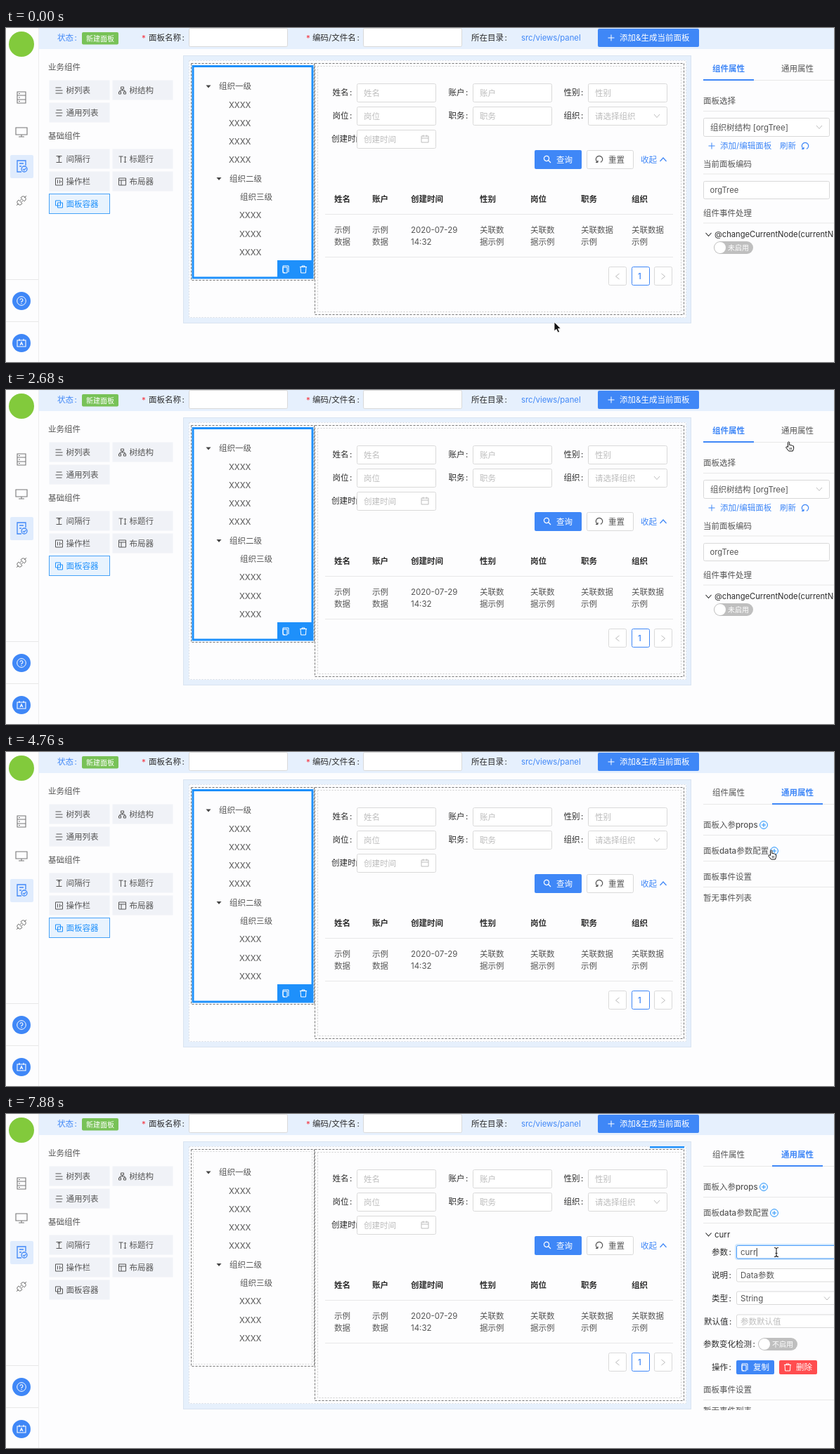
An HTML page that plays this animation: 1178x476 px, repeating every 8000 ms.

```html
<!DOCTYPE html>
<html lang="zh-CN">
<head>
<meta charset="utf-8">
<title>面板编辑器</title>
<style>
html, body { margin: 0; width: 100%; height: 100%; overflow: hidden; background: #fdfdfe; }
svg { display: block; overflow: hidden; }
text { font: 11.5px Inter, "Noto Sans CJK SC", "Noto Sans CJK", sans-serif; white-space: pre; }
</style>
</head>
<body>
<svg id="stage" width="1178" height="476" viewBox="0 0 1178 476"></svg>
<script>
const BLUE = '#3f87f7', BRIGHT = '#1e90fb', TEXT = '#555', DARK = '#2b2b2b';
const HINT = '#bdbdbd', LINE = '#e8e8e8', EDGE = '#d9d9d9', LIGHT = '#5ea6ff';

// Drawing helpers; text is placed by its left edge and vertical centre.
const text = (x, y, s, color = TEXT, weight = 400, size = 11.5) =>
  `<text x="${x}" y="${y + size * .37}" fill="${color}" style="font-weight:${weight};font-size:${size}px">${s.replace(/&/g, '&amp;')}</text>`;
const box = (x, y, w, h, fill, stroke = 'none', r = 0, extra = '') =>
  `<rect x="${x}" y="${y}" width="${w}" height="${h}" rx="${r}" fill="${fill}" stroke="${stroke}" ${extra}/>`;
const icon = (x, y, d, color = TEXT, width = 1, fill = 'none') =>
  `<path transform="translate(${x} ${y})" d="${d}" fill="${fill}" stroke="${color}" stroke-width="${width}"/>`;
const dot = (x, y, r, fill, stroke = 'none') =>
  `<circle cx="${x}" cy="${y}" r="${r}" fill="${fill}" stroke="${stroke}"/>`;
const rule = (x, y, w, color = LINE) => box(x, y, w, 1, color);
const group = (id, body, extra = '') => `<g id="${id}" ${extra}>${body}</g>`;
const label = (x, y, s, color = DARK) =>
  text(x, y, s, color) + text(x + s.replace('/', '').length * 11.5 + (s.includes('/') ? 6 : 1.5), y, ':', color);
const field = (x, y, w, h, s = '', color = TEXT, pad = 10) =>
  box(x + .5, y + .5, w - 1, h - 1, '#fff', EDGE, 2) + text(x + pad, y + h / 2, s, color);
const dashes = (x, y, w, h, color, dash = '3 2') =>
  box(x + .5, y + .5, w, h, 'none', color, 0, `stroke-dasharray="${dash}"`);
const toggle = (x, y, s) =>
  box(x, y, 56, 18, '#bfbfbf', 'none', 9) + dot(x + 9, y + 9, 8, '#fff') + text(x + 20, y + 9, s, '#fff', 400, 10);

const SHAPE = {
  down: 'M-4-2L0 2.5L4-2', up: 'M-4.5 2.5L0-2.5L4.5 2.5', left: 'M2.5-4L-2.5 0L2.5 4', right: 'M-2.5-4L2.5 0L-2.5 4',
  plus: 'M-4.5 0H4.5M0-4.5V4.5', reload: 'M-2 4.4A4.7 4.7 0 1 1 2 4.4M-2 4.4H-5M-2 4.4V1.8',
  search: 'M1.5 1.5A3.6 3.6 0 1 1 1.6 1.4L5 5',
  copy: 'M-4-5H4V4M-4-5V5H-1M-4-3H2V5H-2L-4 3Z', trash: 'M-5-3.5H5M-2-3.5V-5H2V-3.5M-4-3.5L-3.4 5H3.4L4-3.5',
  calendar: 'M-5-4H5V5H-5ZM-5-1H5M-2.5-5.5V-3M2.5-5.5V-3',
  lines: 'M-5-4H3M-5 0H5M-5 4H5', list: 'M-4-4H4M-5 0H5M-4 4H4',
  tree: 'M-2-5H2V-2H-2ZM-5 2H-2V5H-5ZM2 2H5V5H2ZM0-2V0M-3.5 2V0H3.5V2',
  gap: 'M-4-4.5H4M-4 4.5H4M0-4V4M-2-2L0-4L2-2', title: 'M-5-4H1M-2-4V5M4-4V5M2.5-2.5L4-4L5.5-2.5M2.5 3.5L4 5L5.5 3.5',
  bar: 'M-5-5H5V5H-5ZM-2-2.5V2.5M1-2.5V2.5M3-1V1', layout: 'M-5-5H5V5H-5ZM-5-2H5M-1.5-2V5',
  panel: 'M-5-5H2V2H-5ZM-2-2H5V5H-2Z'
};
const put = (x, y, name, color, width) => icon(x, y, SHAPE[name], color, width);

function header() {
  return box(47, 0, 1131, 30, '#e6f0fd') + label(73, 14, '状态', BLUE) +
    box(108, 6, 52, 17.5, '#78c257', 'none', 2) + text(114, 15, '新建面板', '#fff', 400, 10) +
    text(193, 15, '*', '#f5333f') + label(203, 14, '面板名称') + field(260, 0, 141, 27) +
    text(427, 15, '*', '#f5333f') + label(436, 14, '编码/文件名') + field(508, 0, 141, 27) +
    label(662, 14, '所在目录') + text(733, 14, 'src/views/panel', BLUE, 400, 11.3) +
    box(842, 1, 144, 26, BLUE, 'none', 2) + put(861, 14, 'plus', '#fff') + text(873, 14, '添加&生成当前面板', '#fff');
}

function sidebar() {
  const gray = '#777';
  return box(46, 0, 1, 476, '#ededed') + dot(22, 23, 18, '#82ca3c') +
    icon(22, 99, 'M-6-8H6V8H-6ZM-6-3H6M-6 3H6M-4-5.5H-2M-4 0H-2M-4 5.5H-2', gray, 1.1) +
    icon(22, 148, 'M-8-6H8V4H-8ZM0 4V7M-4 7H4', gray, 1.1) +
    box(6, 181, 33, 33, '#e0ecfd', 'none', 2) +
    icon(22, 197, 'M6-1V-8H-6V8H0M-3-4H3M-3 0H0M8 4A4 4 0 1 1 0 4A4 4 0 1 1 8 4M2 4L3.7 5.6L6.3 2.7', BLUE, 1.3) +
    icon(22, 246, 'M7-7L4-4M-7 7L-4 4M-1-4L1-6A4 4 0 0 1 6-1L4 1ZM-4-1L-6 1A4 4 0 0 0-1 6L1 4ZM-2 0L0-2M0 2L2 0', gray, 1) +
    rule(0, 358, 46) + rule(0, 418, 46) + dot(22, 389, 13, BLUE) + dot(22, 449, 13, BLUE) +
    dot(22, 389, 6.3, 'none', '#fff') + icon(22, 389, 'M-2-1.5A2 2 0 1 1 0 .8V1.8M0 2.8V4', '#fff', 1.1) +
    icon(22, 449, 'M-6-4H6V5H-6ZM-3-6V-3M3-6V-3M-2 3L0-1.5L2 3M-1.2 1.5H1.2', '#fff', 1.1);
}

function tool(col, y, name, s, on) {
  const x = col ? 151 : 61, color = on ? BRIGHT : TEXT;
  return box(x + .5, y + .5, 86, 28, on ? '#e8f3fe' : '#f0f2f7', on ? '#46a2f8' : 'none') +
    put(x + 14.5, y + 15, name, color) + text(x + 24.5, y + 14.5, s, color);
}

function palette() {
  return text(60, 56, '业务组件') + text(60, 154, '基础组件') +
    tool(0, 74, 'lines', '树列表') + tool(1, 74, 'tree', '树结构') + tool(0, 106, 'list', '通用列表') +
    tool(0, 172, 'gap', '间隔行') + tool(1, 172, 'title', '标题行') +
    tool(0, 204, 'bar', '操作栏') + tool(1, 204, 'layout', '布局器') + tool(0, 236, 'panel', '面板容器');
}

function tree() {
  const rows = [[303, '组织一级', 1], [317, 'XXXX'], [317, 'XXXX'], [317, 'XXXX'], [317, 'XXXX'],
    [318, '组织二级', 1], [333, '组织三级'], [332, 'XXXX'], [332, 'XXXX'], [332, 'XXXX']];
  return rows.map(([x, s, open], i) => {
    const y = 83 + i * 26.3;
    return text(x, y, s) + (open ? icon(x - 15, y, 'M-3.5-1.5H3.5L0 2.5Z', 'none', 0, '#444') : '');
  }).join('');
}

function form() {
  const cols = [499, 664, 828], names = ['姓名', '账户', '性别', '岗位', '职务', '组织', '创建时间'];
  return names.map((s, i) => {
    const x = cols[i % 3], y = 79 + 33 * Math.floor(i / 3);
    return label(i === 6 ? 463 : x - 34.5, y + 13, s) +
      field(x, y, 113, 27, s === '组织' ? '请选择组织' : s, HINT);
  }).join('') + put(926, 125, 'down', HINT) + put(596, 158, 'calendar', HINT) +
    box(752, 174, 67, 27, BLUE, 'none', 2) + put(770, 187, 'search', '#fff', 1.2) + text(783, 187.5, '查询', '#fff', 500) +
    box(826.5, 174.5, 66, 26, '#fff', EDGE, 2) + put(844, 187, 'reload', TEXT, 1.2) + text(857, 187.5, '重置') +
    text(903, 187.5, '收起', BLUE) + put(935, 187.5, 'up', BLUE, 1.2);
}

function table() {
  const cols = [[467, '姓名', '示例', '数据'], [521, '账户', '示例', '数据'], [576, '创建时间', '2020-07-29', '14:32'],
    [674, '性别', '关联数', '据示例'], [746, '岗位', '关联数', '据示例'], [818, '职务', '关联数据', '示例'], [890, '组织', '关联数据', '示例']];
  const page = (x, color) => box(x + .5, 340.5, 25, 26, '#fff', color, 2);
  return cols.map(([x, head, a, b]) => text(x, 243.5, head, DARK, 600) + text(x, 288, a) + text(x, 305, b)).join('') +
    rule(454, 265, 495) + rule(454, 326, 495) + page(857, EDGE) + page(890, BLUE) + page(922, EDGE) +
    put(870, 354, 'left', HINT) + put(935, 354, 'right', HINT) + text(899, 354, '1', BLUE, 500);
}

function canvas() {
  return box(252.5, 39.5, 722, 381, '#e6f0fc', '#d9e4f1') + box(260, 46, 708, 367, '#fdfdfe') +
    dashes(260, 46, 707, 366, '#d8dde4', '2 2') +
    dashes(263, 50, 175, 309, '#777') + dashes(266, 53, 169, 303, '#d5d5d5', '2 2') +
    dashes(439, 50, 525, 358, '#777') + dashes(443, 54, 517, 350, '#cfcfcf', '2 2') +
    tree() + form() + table() +
    group('hover', [[262, 49, 703, 360], [442, 54, 518, 350], [445, 58, 512, 342]]
      .map(([x, y, w, h]) => box(x + .5, y + .5, w, h, 'none', '#2f97f5')).join('')) +
    group('picked', tool(0, 236, 'panel', '面板容器', true) + box(266, 54.5, 170, 301.5, 'none', BRIGHT, 0, 'stroke-width="3"') +
      box(386, 331, 51, 26, BRIGHT) + put(398, 344, 'copy', '#fff') + put(423, 344, 'trash', '#fff')) +
    group('strip', box(916, 46, 49, 2.5, BRIGHT));
}

const addMark = (x, y) => dot(x, y, 5.4, 'none', BRIGHT) + icon(x, y, 'M-3 0H3M0-3V3', BRIGHT);
const section = (y, s) => text(992, y, s, TEXT, 500) + rule(992, y + 14, 186);

function partTab() {
  return section(104, '面板选择') + field(992, 128, 180, 27, '组织树结构 [orgTree]') + put(1157, 141, 'down', HINT) +
    put(1004, 168, 'plus', BLUE) + text(1016, 168, '添加/编辑面板', BLUE) + text(1101, 168, '刷新', BLUE) + put(1137, 168, 'reload', BLUE, 1.2) +
    section(193.5, '当前面板编码') + field(992, 218, 180, 26) + text(1001.5, 231, 'orgTree', TEXT, 400, 11.2) + section(263.5, '组件事件处理') +
    put(999.5, 294, 'down', DARK, 1.1) + text(1008, 294, '@changeCurrentNode(currentNode)', DARK, 400, 11.2) + toggle(1007, 304, '未启用');
}

function commonTab() {
  const row = (y, x, name, s, color) => label(x, y, name) + field(1039, y - 10, 160, 19.5, s, color, 6);
  return section(104, '面板入参props') + addMark(1078, 104) + section(141, '面板data参数配置') + addMark(1093, 141) +
    group('empty', section(178, '面板事件设置') + text(992, 208, '暂无事件列表')) +
    group('params', put(999.5, 171.5, 'down', DARK, 1.1) + `<g id="head"></g>` + row(197, 1004, '参数', '') +
      `<g id="entry"></g>` + row(230, 1004, '说明', 'Data参数') + row(262.5, 1004, '类型', 'String') +
      put(1168, 262.5, 'down', HINT) + row(295.5, 993, '默认值', '参数默认值', HINT) +
      label(992, 328, '参数变化检测') + toggle(1070, 319, '不启用') + label(1004, 361, '操作') +
      box(1039, 351, 54, 20, BLUE, 'none', 2) + put(1051, 361, 'copy', '#fff') + text(1063, 361, '复制', '#fff') +
      box(1100, 351, 54, 20, '#ff4d4f', 'none', 2) + put(1112, 361, 'trash', '#fff') + text(1124, 361, '删除', '#fff') +
      section(393, '面板事件设置') + group('cut', text(992, 423, '暂无事件列表'), 'clip-path="url(#fold)"'));
}

const pointers = {
  arrow: icon(0, 0, 'M0 0V13L3 10.3L5.2 15L7.5 14L5.4 9.5H9.3Z', '#fff', .8, '#111'),
  hand: icon(0, 0, 'M3.5 8.5V1.6Q4.6 0 5.7 1.6V5.6Q7 4.6 7.8 5.9Q9.2 5.2 9.8 6.6Q11.5 6 11.6 8V10.5L10.4 14H4.6L.8 9.2Q.8 7.5 2.3 7.8Z', '#111', 1, '#fff') +
    icon(0, 0, 'M6.3 9V12M8.3 9V12', '#111', .8),
  beam: icon(0, 0, 'M-3-6.5Q0-6.5 0-4.5Q0-6.5 3-6.5M0-4.5V4.5M-3 6.5Q0 6.5 0 4.5Q0 6.5 3 6.5M-1.5 1.5H1.5', '#222', 1.1)
};

const stage = document.getElementById('stage');
stage.innerHTML = '<defs><clipPath id="fold"><rect x="980" y="400" width="198" height="22"/></clipPath></defs>' +
  header() + sidebar() + palette() + canvas() +
  rule(992, 74, 186) + group('tabs', '') + group('ink', box(0, 73, 72, 2, BLUE)) +
  group('part', partTab()) + group('common', commonTab()) +
  Object.keys(pointers).map(k => group(k, pointers[k])).join('');

const el = id => document.getElementById(id);
const show = (id, on) => el(id).setAttribute('display', on ? 'inline' : 'none');
const move = (id, x, y) => el(id).setAttribute('transform', `translate(${x} ${y})`);

// [time, pointer, x, y]; a missing pointer name keeps the previous one.
const path = [
  [0, 'arrow', 780, 419], [450, , 781, 420], [600, , 782, 419], [1340, , 786, 416], [1490, , 795, 410],
  [1940, , 989, 208], [2090, , 1052, 165], [2240, , 1089, 125], [2390, , 1104, 100], [2540, , 1111, 84],
  [2680, 'hand', 1109, 73], [2830, , 1109, 69], [2980, , 1108, 65],
  [3560, , 1107, 70], [3710, 'arrow', 1103, 102], [3860, , 1095, 125], [4010, 'hand', 1086, 136], [4160, , 1084, 138],
  [4760, , 1084, 139], [5200, , 1084, 152], [5350, , 1083, 177], [5490, 'beam', 1091, 190], [5640, , 1095, 195], [5790, , 1096, 197]
];
let kind;
path.forEach(p => { p[1] = kind = p[1] || kind; });

const typed = [[0, 'data'], [7580, 'c'], [7730, 'cur'], [7880, 'curr']];
const ink = [[0, 992], [3120, 1020], [3270, 1084], [3410, 1090]];
const at = (steps, t) => steps.filter(s => s[0] <= t).pop();
const within = (t, a, b = 8000) => t >= a && t < b;

function entry(t, word) {
  const focus = Math.min(1, Math.max(0, (t - 5790) / 300)), selected = within(t, 6240, 7580);
  let s = '';
  if (t >= 5640) s += box(1038, 186, 160, 21, 'none', BRIGHT, 3, `stroke-width="2" stroke-opacity="${.2 * focus}"`) +
    box(1039.5, 187.5, 159, 18.5, '#fff', '#4b9dfb', 2);
  if (selected) s += box(1045, 189, 25, 16, BRIGHT);
  s += text(1045, 197, word, selected ? '#fff' : TEXT);
  return s;
}

let last = '';
function draw(now) {
  const t = now % 8000, [, cursor, x, y] = at(path, t);
  const common = t >= 3120, params = t >= 5050, word = at(typed, t)[1];
  for (const k in pointers) show(k, k === cursor);
  move(cursor, x, y);
  move('ink', at(ink, t)[1], 0);
  show('hover', within(t, 1940, 2090));
  show('picked', !params);
  show('strip', params);
  show('part', !common);
  show('common', common);
  show('empty', !params);
  show('params', params);
  const over = within(t, 2830, 3710);
  const body = [
    text(1005, 58, '组件属性', common ? TEXT : BLUE, common ? 400 : 600) +
      text(1103, 58, '通用属性', over ? LIGHT : common ? BLUE : TEXT, common ? 600 : 400),
    text(1008, 171.5, word, DARK), entry(t, word)
  ];
  if (body.join() !== last) {
    last = body.join();
    ['tabs', 'head', 'entry'].forEach((id, i) => { el(id).innerHTML = body[i]; });
    if (t >= 7580) {
      const end = 1045 + el('entry').querySelector('text').getComputedTextLength();
      el('entry').innerHTML += box(end + .5, 191, 1, 12, '#333');
    }
  }
}

const start = performance.now();
function tick() {
  draw(performance.now() - start);
  requestAnimationFrame(tick);
}
tick();
</script>
</body>
</html>
```
